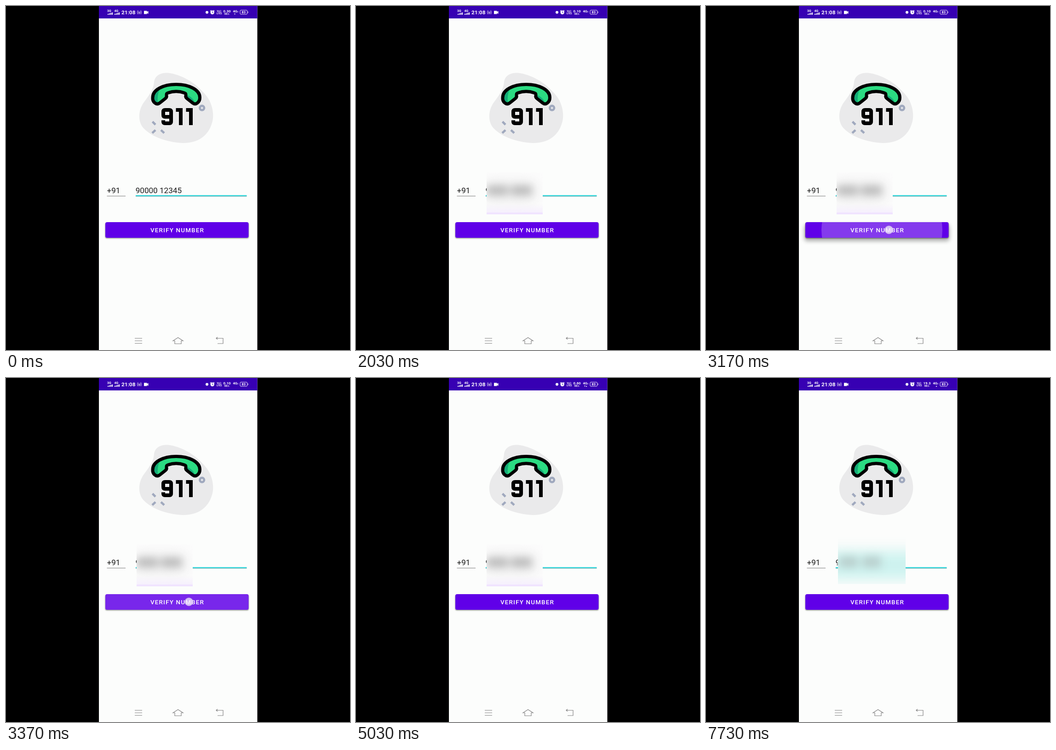
These frames come from a looping animation (748x748 px, 8 s). An HTML page:

```html
<!DOCTYPE html>
<html lang="en">
<head>
<meta charset="utf-8">
<title>Verify number</title>
<style>
html, body { margin: 0; width: 100%; height: 100%; overflow: hidden; background: #000; }
svg { display: block; width: 100vw; height: 100vh; font-family: Roboto, sans-serif; }
.bar { fill: #fff; font-weight: 700; }
.line { fill: none; stroke: #858585; stroke-width: 1.2; }
.soft { filter: blur(9px); }
.softer { filter: blur(14px); }

.hard, .ease { animation: 8s infinite both; }
.hard { animation-timing-function: step-end; }
.ease { animation-timing-function: linear; }

.s1 { animation-name: s1; }
.s2 { animation-name: s2; }
.s3 { animation-name: s3; }
.s4 { animation-name: s4; }
@keyframes s1 { 0% { opacity: 1 } 12.5%, 100% { opacity: 0 } }
@keyframes s2 { 0% { opacity: 0 } 12.5% { opacity: 1 } 50%, 100% { opacity: 0 } }
@keyframes s3 { 0% { opacity: 0 } 50% { opacity: 1 } 87.5%, 100% { opacity: 0 } }
@keyframes s4 { 0% { opacity: 0 } 87.5%, 100% { opacity: 1 } }

.mask1 { animation-name: mask1; }
.mask2 { animation-name: mask2; }
.mask3 { animation-name: mask3; }
@keyframes mask1 { 0% { opacity: 0 } .375% { opacity: 1 } 77.3%, 100% { opacity: 0 } }
@keyframes mask2 { 0% { opacity: 0 } 75.2% { opacity: 1 } 77.3%, 100% { opacity: 0 } }
@keyframes mask3 { 0% { opacity: 0 } 77.3%, 100% { opacity: 1 } }

.caret { animation-name: caret; }
.blink { animation: blink 1s linear infinite; }
@keyframes caret { 0% { opacity: 1 } 96.6%, 100% { opacity: 0 } }
@keyframes blink { 0%, 47% { opacity: 0 } 57%, 99.9% { opacity: 1 } 100% { opacity: 0 } }

.dot { animation-name: dot; }
.grow { animation-name: grow; }
.glow { animation-name: glow; }
.lift { animation-name: lift; }
@keyframes dot { 0% { opacity: 0 } 37.875% { opacity: .75 } 42.8%, 100% { opacity: 0 } }
@keyframes grow {
  0%, 38.5625% { transform: translate(397px, 487px) scale(.59); animation-timing-function: cubic-bezier(.4, 0, .2, 1) }
  41.375%, 100% { transform: translate(372px, 487px) scale(1) }
}
@keyframes glow { 0%, 38.5% { opacity: 0 } 39.4%, 41.375% { opacity: .23 } 43.75%, 100% { opacity: 0 } }
@keyframes lift { 0%, 38.4% { opacity: 0 } 39.6%, 40.6% { opacity: 1 } 42%, 100% { opacity: 0 } }
</style>
</head>
<body>
<svg viewBox="0 0 748 748">
  <defs>
    <clipPath id="btn"><rect x="216" y="470" width="311.500" height="34" rx="4"/></clipPath>
    <clipPath id="box1"><rect x="284" y="362" width="121.500" height="91"/></clipPath>
    <clipPath id="box2"><rect x="287" y="301" width="146.500" height="146.500"/></clipPath>
    <clipPath id="screen"><rect x="202" width="344.500" height="748"/></clipPath>
    <linearGradient id="lilac" x2="0" y2="1">
      <stop offset="0" stop-color="#f0e4ff" stop-opacity="0"/>
      <stop offset="1" stop-color="#f0e4ff"/>
    </linearGradient>
    <path id="handset" d="M319 199C319 182 342 170.500 370 170.500S421.500 182 421.500 199C421.500 204 420 208 416 211Q411 215 406 211L394 201.500Q390 199 391 194Q391.500 190 388 189Q370 182.500 352 189Q348.500 190 349 194Q350 199 346 201.500L334 211Q329 215 324 211C320 208 318.500 204 319 199Z"/>
    <clipPath id="inside"><use href="#handset"/></clipPath>
    <path id="signal" d="M0 19v-2h2v2zM3 19v-3h2v3zM6 19v-4h2v4zM9 19v-5h2v5z"/>
    <path id="one" d="M0 226H10.500V259"/>
  </defs>

  <rect width="748" height="748"/>
  <g clip-path="url(#screen)">
    <rect x="202" width="345" height="748" fill="#fcfdfc"/>
    <rect x="202" width="345" height="27" fill="#3700b3"/>

    <!-- status bar -->
    <g class="bar">
      <text x="220" y="13.300" font-size="7">3G</text>
      <text x="235.500" y="13.300" font-size="7">4G</text>
      <use href="#signal" x="221"/>
      <use href="#signal" x="236"/>
      <text x="251" y="18" font-size="11.800">21:08</text>
      <g fill="none" stroke="#fff" stroke-width=".9">
        <path d="M287 9.500q-3 4 0 8.500M293 9.500q3 4 0 8.500M288.800 11.500q-1.500 2 0 4.500M291.200 11.500q1.500 2 0 4.500M290 13v5"/>
        <rect x="509" y="9" width="15.500" height="9" rx="2"/>
        <path d="M526.300 12v3.200"/>
      </g>
      <path d="M300 10.500h6.500v2l3-1.500v6l-3-1.500v2H300z"/>
      <circle cx="437" cy="13.700" r="3"/>
      <circle cx="448.700" cy="14" r="4.200"/>
      <path d="M444 11.300l2.500-2M453.400 11.300l-2.500-2" stroke="#fff" stroke-width="1.200"/>
      <path d="M448.700 11.500v2.700h2" fill="none" stroke="#3700b3"/>
      <text x="458.500" y="12.800" font-size="5">Vo))</text>
      <text x="458" y="18.300" font-size="5.200">LTE2</text>
      <text x="475" y="18.500" font-size="4.800">KB/s</text>
      <text x="493.500" y="14" font-size="7.500">4G<tspan font-size="4">2</tspan></text>
      <text x="512.500" y="16.400" font-size="7.500">83</text>
      <g font-size="8">
        <g class="hard s1"><text x="472.500" y="13.500">0.30</text><path d="M496 16.500h3l-1.500 2.500z"/></g>
        <g class="hard s2"><text x="472.500" y="13.500">0.10</text></g>
        <g class="hard s3"><text x="472.500" y="13.500">0.60</text><path d="M496 16.500h3l-1.500 2.500zM499.500 19h3l-1.500-2.500z"/></g>
        <g class="hard s4"><text x="472.500" y="13.500">19.3</text><path d="M499.500 19h3l-1.500-2.500z"/></g>
      </g>
    </g>

    <!-- illustration -->
    <path fill="#eaeaeb" d="M322 166C324 146 345 143 362 147C395 155 420 175 437 197C450 215 453 238 448 254C440 282 418 298 385 298C345 296 312 282 296 262C287 248 288 228 298 212C310 195 320 185 322 166Z"/>
    <use href="#handset" fill="#2bdb82"/>
    <path clip-path="url(#inside)" fill="#14ab78" d="M315 217V188L336 178Q327 192 331 217ZM388 192L397 195Q411 202 411 217H400Z"/>
    <use href="#handset" fill="none" stroke="#000" stroke-width="7"/>
    <g fill="none" stroke="#000" stroke-width="8">
      <path d="M359 241H346Q342 241 342 237V230Q342 226 346 226H355Q359 226 359 230V251Q359 255 355 255H346Q342 255 342 251V248.500"/>
      <use href="#one" x="369.500"/>
      <use href="#one" x="391.500"/>
    </g>
    <g fill="none" stroke="#a0a9be" stroke-width="4.800">
      <circle cx="426.200" cy="221.700" r="4.700"/>
      <path d="M318.500 251.500l6.500 6.500M318 276.200l7-6.400M337 269.800l7 6.400"/>
    </g>

    <!-- fields -->
    <g font-size="17.100" fill="#1c1c1c">
      <text x="219.500" y="406.500">+91</text>
      <text x="281.700" y="406.500">90000 12345</text>
    </g>
    <path d="M219.500 413.200H260" stroke="#777" stroke-width="1.100"/>
    <path d="M282 412.300H523.500" stroke="#2adbe0" stroke-width="2.200"/>
    <path d="M282 413.900H523.500" stroke="#5a9c9e"/>

    <!-- blurred patches -->
    <g class="hard mask1" clip-path="url(#box1)">
      <rect x="284" y="362" width="122" height="91" fill="#fcfcfc"/>
      <rect class="softer" x="280" y="382" width="110" height="44" fill="#eee"/>
      <g class="soft" fill="#b9b9b9">
        <rect x="285" y="391" width="45" height="20"/>
        <rect x="337" y="391" width="45" height="20"/>
      </g>
      <rect x="284" y="430" width="122" height="19" fill="url(#lilac)" opacity=".5"/>
      <rect x="284" y="449" width="122" height="4" fill="#f0e4ff"/>
    </g>
    <g class="hard mask2" clip-path="url(#box2)">
      <rect x="287" y="301" width="147" height="147" fill="#fcfcfb"/>
      <rect class="softer" x="280" y="376" width="115" height="56" fill="#dcdcdc"/>
      <rect class="softer" x="404" y="384" width="50" height="50" fill="#c4f4f2"/>
    </g>
    <g class="hard mask3" clip-path="url(#box2)">
      <rect x="287" y="301" width="147" height="147" fill="#fcfdfc"/>
      <rect class="softer" x="255" y="376" width="215" height="62" fill="#cdf2ef"/>
      <g class="soft" fill="#b9cfcd">
        <rect x="290" y="388" width="40" height="24"/>
        <rect x="340" y="388" width="40" height="24"/>
      </g>
    </g>
    <g class="hard caret"><g class="blink">
      <rect x="281.500" y="390" width="1.800" height="21" fill="#2adbe0"/>
      <rect x="284" y="380" width="8" height="50" fill="#2adbe0" opacity=".07"/>
    </g></g>

    <!-- button -->
    <rect x="215.500" y="471.500" width="312.500" height="34" rx="4" fill="#000" opacity=".4" style="filter:blur(1.300px)"/>
    <g class="ease lift"><rect x="214" y="476" width="315" height="35" rx="5" fill="#000" opacity=".32" style="filter:blur(5px)"/></g>
    <g clip-path="url(#btn)">
      <rect x="216" y="470" width="312" height="34" fill="#6000e8"/>
      <g class="ease glow"><circle class="ease grow" r="159" fill="#fff"/></g>
    </g>
    <text x="372.500" y="492.200" text-anchor="middle" font-size="13.400" font-weight="500" letter-spacing="1.200" fill="#fff">VERIFY NUMBER</text>
    <circle class="hard dot" cx="397.700" cy="486.700" r="9" fill="#f4ecfb" stroke="#b9a0d8" stroke-width=".6"/>

    <!-- navigation -->
    <g class="line">
      <path d="M280 722.500h16M280 728h16M280 733.500h16"/>
      <path d="M363 728L374 721L385 728H381V734.500H367V728Z"/>
      <path d="M460 720L457 722.500L460 725M457 722.500H472V734H460"/>
    </g>
  </g>
</svg>
</body>
</html>
```
